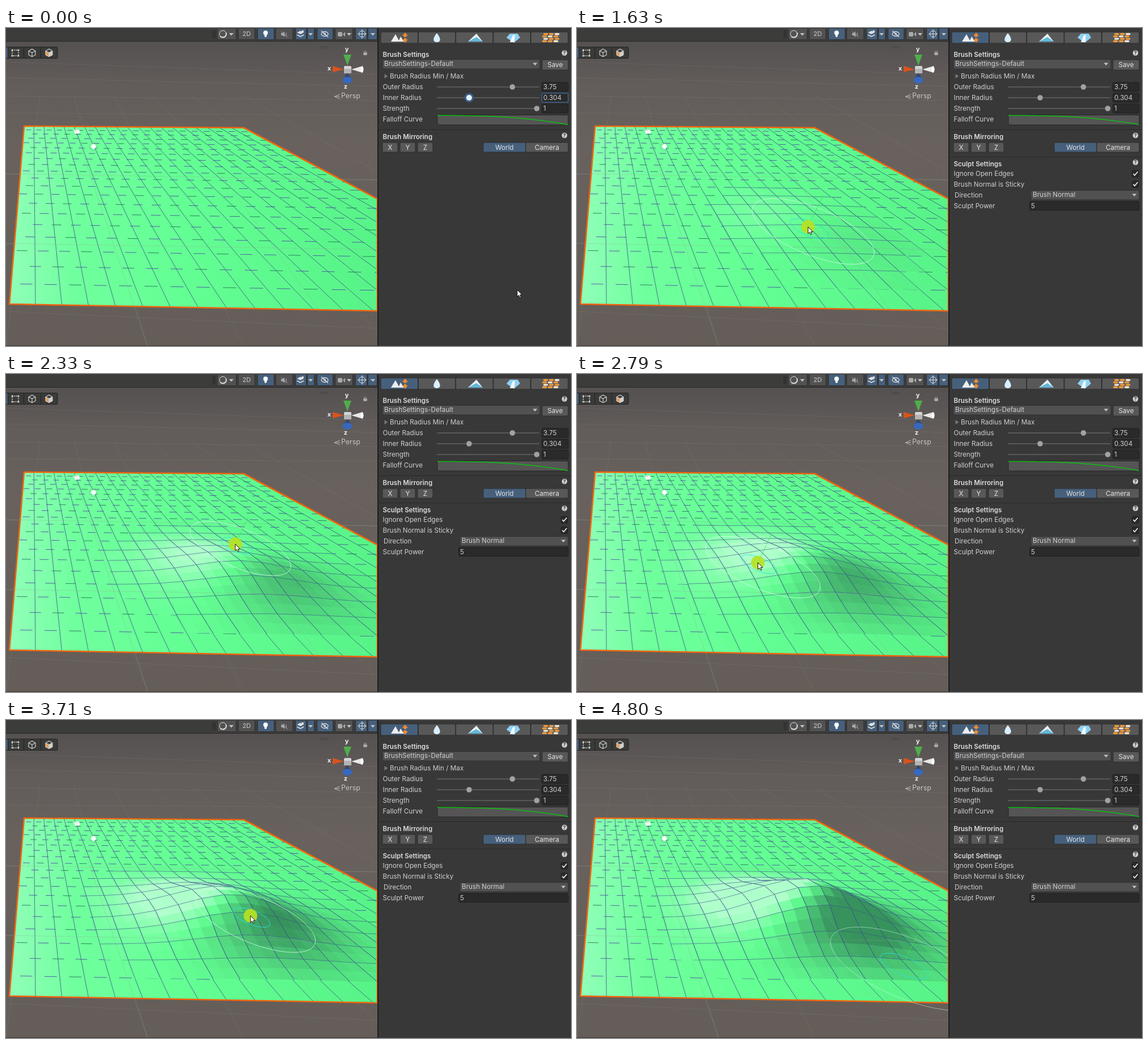
An HTML page with a canvas for the animation above (5420 ms loop, 998 by 561 pixels).

```html
<!DOCTYPE html>
<html lang="en">
<head>
<meta charset="utf-8">
<title>Mesh sculpting</title>
<style>
  html, body { margin: 0; width: 100%; height: 100%; overflow: hidden; background: #383838; }
  canvas { display: block; }
</style>
</head>
<body>
<canvas id="stage" width="998" height="561"></canvas>
<script>
const c = document.getElementById('stage').getContext('2d');
const LOOP = 5420, STEP = 77.7, SCULPT_AT = 760, SCENE_W = 656, N = 20;
const BLUE = '#46607c', GREY = '#585858', TEXT = '#d0d0d0';

// ---------- helpers ----------
const rgb = a => `rgb(${a.map(Math.round).join()})`;
const mix = (a, b, f) => a.map((v, i) => v + (b[i] - v) * f);
const ramp = (t, a, b) => Math.min(1, Math.max(0, (t - a) / (b - a)));

// Piecewise linear lookup in rows of [key, ...values].
function along(rows, at) {
  let n = rows.findIndex(r => r[0] > at);
  if (n < 0) return rows[rows.length - 1].slice(1);
  if (n === 0) return rows[0].slice(1);
  const a = rows[n - 1], b = rows[n];
  return mix(a, b, (at - a[0]) / (b[0] - a[0])).slice(1);
}
function rect(x, y, w, h, fill, border) {
  c.beginPath();
  c.roundRect(x, y, w, h, 2);
  c.fillStyle = fill;
  c.fill();
  if (border) { c.strokeStyle = border; c.lineWidth = 1; c.stroke(); }
}
function disc(x, y, r, fill) {
  c.beginPath();
  c.arc(x, y, r, 0, 7);
  c.fillStyle = fill;
  c.fill();
}
function path(points, closed) {
  c.beginPath();
  points.forEach(p => c.lineTo(p[0], p[1]));
  if (closed) c.closePath();
}
function poly(points, fill) { path(points, true); c.fillStyle = fill; c.fill(); }
function line(points, color, width = 1) {
  path(points);
  c.strokeStyle = color;
  c.lineWidth = width;
  c.stroke();
}
function text(s, x, y, { size = 11.7, weight = 400, color = TEXT, align = 'left' } = {}) {
  c.font = `${weight} ${size}px Inter, sans-serif`;
  c.fillStyle = color;
  c.textAlign = align;
  c.textBaseline = 'middle';
  c.fillText(s, x, y + 0.5);
}
const arrowDown = (x, y) => poly([[x - 4, y - 2], [x + 4, y - 2], [x, y + 2.5]], '#c4c4c4');

// ---------- mesh: column i from the left, row k from the front ----------
function vertex(i, k, lift = 0) {
  const u = i / N, v = 1 - k / N;
  const f = u * 0.885 / (1 - 0.115 * u), d = v * 0.41 / (1 - 0.59 * v);
  const left = [32 - 26 * d, 173 + 314 * d], right = [420 + 620 * d, 176 + 330 * d];
  const p = mix(left, right, f);
  return [p[0] + lift * 0.42, p[1] - lift];
}
// Sculpt strokes: column, row, height, start, end
const strokes = [
  [11, 5, 26, 1400, 2420],
  [9.5, 5.3, 20, 2420, 3500],
  [11.8, 5.1, 20, 3600, 4800]
];
function height(i, k, t) {
  let sum = 0;
  for (const [ci, ck, h, a, b] of strokes)
    sum += h * ramp(t, a, b) * Math.exp(-((i - ci) ** 2) / 8.8 - ((k - ck) ** 2) / 5.8);
  return sum < 0.4 ? 0 : sum;
}
const greens = [[0, 146, 255, 186], [120, 112, 255, 158], [300, 100, 255, 148], [656, 88, 243, 136]];

function shade(i, k, t, x) {
  const e = 0.5;
  const across = height(i + e, k, t) - height(i - e, k, t);
  const back = height(i, k + e, t) - height(i, k - e, t);
  const light = across * 1.2 - back * 0.9;
  const base = along(greens, x);
  return rgb(light > 0 ? mix(base, [200, 255, 222], Math.min(0.75, light / 13))
                       : mix(base, [48, 128, 84], Math.min(0.85, -light / 22)));
}
function hill(t) {
  const at = (i, k) => {
    const i0 = Math.floor(i), k0 = Math.floor(k), f = i - i0, g = k - k0;
    const h = (a, b) => height(a, b, t);
    const front = h(i0, k0) * (1 - f) + h(i0 + 1, k0) * f;
    const back = h(i0, k0 + 1) * (1 - f) + h(i0 + 1, k0 + 1) * f;
    return vertex(i, k, front * (1 - g) + back * g);
  };
  for (let k = 11; k >= 1; k--) {
    const raised = [];
    for (let i = 4; i < 18; i++)
      if (Math.max(height(i, k, t), height(i + 1, k, t), height(i, k + 1, t), height(i + 1, k + 1, t)) > 1)
        raised.push(i);
    for (const i of raised)
      for (const dk of [0.5, 0]) for (const di of [0, 0.5]) {
        const a = i + di, b = k + dk;
        const quad = [at(a, b), at(a + 0.5, b), at(a + 0.5, b + 0.5), at(a, b + 0.5)];
        const color = shade(a + 0.25, b + 0.25, t, quad[0][0]);
        poly(quad, color);
        c.strokeStyle = color;
        c.lineWidth = 0.7;
        c.stroke();
      }
    for (const i of raised) {
      line([at(i, k), at(i, k + 1), at(i + 1, k + 1), at(i + 1, k)], 'rgba(58,78,140,.75)', 0.8);
    }
  }
}
function mesh(t) {
  const outline = [vertex(0, 0), vertex(0, N), vertex(N, N), vertex(N, 0)];
  const fill = c.createLinearGradient(0, 0, SCENE_W, 0);
  for (const [x, ...color] of greens) fill.addColorStop(x / SCENE_W, rgb(color));
  poly(outline, fill);
  for (let i = 1; i < N; i++) line([vertex(i, 0), vertex(i, N)], 'rgba(48,68,130,.8)', 0.9);
  for (let k = 1; k < N; k++)
    for (let i = 0; i < N; i++) {
      const a = i + (k * 0.38) % 1, b = Math.min(N, a + 0.5);
      if (height(a, k, t) < 1)
        line([vertex(a, k), vertex(b, k)], (i + k) % 3 ? 'rgba(78,72,165,.85)' : 'rgba(35,110,85,.85)');
    }
  hill(t);
  const faint = 'rgba(150,160,150,.35)';
  line([[120, 174], [250, 561]], faint);
  line([[318, 174], [555, 500]], faint);
  line([[0, 257], [656, 268]], faint);
  line([[0, 380], [656, 391]], faint);
  path(outline, true);
  c.lineJoin = 'round';
  c.strokeStyle = '#f0640f';
  c.lineWidth = 2.6;
  c.stroke();
  line([vertex(N, N), [655.5, 301], [655.5, 500]], '#f0640f', 2);
}

// ---------- brush and pointer ----------
const approach = [[0, 903, 462], [70, 800, 260], [150, 697, 63], [300, 694, 44], [375, 687, 24]];
const sweep = [
  [760, 440, 330], [1090, 395, 375], [1320, 388, 402], [1480, 400, 376], [1630, 409, 348],
  [1870, 425, 292], [2100, 432, 286], [2330, 403, 301], [2640, 312, 322], [2940, 328, 345],
  [3250, 362, 355], [3520, 480, 350], [3720, 430, 345], [3920, 345, 350], [4170, 460, 347],
  [4400, 510, 385], [4710, 576, 431]
];
function ring(x, y, a, b, color) {
  c.beginPath();
  c.ellipse(x, y, a, b, 0.385, 0, 7);
  c.strokeStyle = color;
  c.lineWidth = 1;
  c.stroke();
}
function brush([x, y], pressed) {
  const s = 0.8 + Math.max(-20, y - 300) * 0.0033;
  line([[x, y], [x + 28 * s, y - 58 * s]], 'rgba(60,225,80,.75)');
  ring(x + 9, y + 8, 119 * s, 43 * s, `rgba(220,255,235,${pressed ? 0.75 : 0.5})`);
  ring(x + 2, y + 3, 37 * s, 13 * s, 'rgba(40,225,225,.85)');
}
function pointer(x, y) {
  path([[0, 0], [0, 12], [2.8, 9.5], [4.6, 13.6], [6.6, 12.7], [4.8, 8.8], [8.4, 8.6]].map(p => [x + p[0], y + p[1]]), true);
  c.fillStyle = '#fff';
  c.fill();
  c.strokeStyle = '#111';
  c.lineWidth = 1;
  c.stroke();
}
const press = (x, y) => disc(x, y, 12, 'rgba(182,226,36,.92)');

// ---------- scene view ----------
function background() {
  const g = c.createLinearGradient(0, 24, 0, 561);
  [[0, '#545150'], [0.14, '#625c5a'], [0.33, '#68615d'], [1, '#645d58']].forEach(s => g.addColorStop(...s));
  c.fillStyle = g;
  c.fillRect(0, 24, SCENE_W, 537);
  const faint = 'rgba(255,255,255,.06)';
  [[60, 82], [88, 103], [120, 128], [150, 154], [258, 268], [380, 391], [500, 530]].forEach(
    ([a, b]) => line([[0, a], [656, b]], faint));
  [[0, -300], [60, 0], [120, 250], [190, 420], [260, 680], [330, 900], [420, 1200]].forEach(
    ([a, b]) => line([[a, 120], [b, 561]], faint));
}
function sceneIcons() {
  poly([[120, 181], [129, 179], [131, 185], [122, 187]], '#f4f4f4');
  disc(124, 180, 2, '#ddd');
  c.setLineDash([1.5, 1.5]);
  ring(154.5, 209, 7, 7, '#8a8f88');
  c.setLineDash([]);
  disc(154.5, 209, 4.2, '#fff');
}
function gizmo() {
  line([[555, 32.5], [570, 32.5]], '#444');
  line([[555, 35], [570, 35]], '#444');
  const label = { size: 11, weight: 700, color: '#f0f0f0', align: 'center' };
  text('y', 602, 37, label);
  text('x', 571, 71, label);
  text('z', 600, 103, label);
  poly([[596, 47], [610, 47], [603, 66]], '#4fae4b');
  poly([[577, 67], [597, 73], [577, 78]], '#d9531c');
  poly([[630, 67], [610, 73], [630, 79]], '#e8e8e8');
  c.beginPath(); c.ellipse(629, 73, 2.5, 5.5, 0, 0, 7); c.fillStyle = '#fff'; c.fill();
  rect(597, 67, 13, 13, '#d4d4d4');
  c.fillStyle = '#b4b4b4'; c.fillRect(597, 72, 13, 8);
  poly([[603, 80], [595, 91], [611, 91]], '#27477f');
  c.beginPath(); c.ellipse(603, 92, 8.5, 6, 0, 0, 7); c.fillStyle = '#3768bd'; c.fill();
  rect(631, 43, 7, 5, '#aaa');
  c.beginPath(); c.arc(634.5, 43, 2.3, Math.PI, 0); c.strokeStyle = '#aaa'; c.stroke();
  for (const y of [117, 121, 125]) line([[590, y], [580, 121]], '#b8b8b8');
  text('Persp', 592, 120, { size: 12.4, color: '#c4c4c4' });
}
function cube(x, y, solid) {
  const p = [[x, y - 6.5], [x + 6, y - 3], [x + 6, y + 4], [x, y + 7], [x - 6, y + 4], [x - 6, y - 3]];
  if (solid) poly([[x, y], p[1], p[2], p[3]], '#d0d0d0');
  if (solid) poly([[x, y], p[3], p[4], p[5]], '#e89b4c');
  line([...p, p[0]], '#d0d0d0', 1.2);
  line([p[5], [x, y], p[1]], '#d0d0d0', 1.2);
  line([[x, y], p[3]], '#d0d0d0', 1.2);
}
function toolbars() {
  c.fillStyle = '#3c3c3b';
  c.fillRect(0, 0, SCENE_W, 23);
  line([[0, 23.5], [656, 23.5]], '#272727');
  line([[366, 4], [366, 18]], '#222');
  line([[369, 4], [369, 18]], '#222');
  [[373, 34], [410, 30], [444, 30, 1], [476, 31], [511, 20, 1], [532, 13, 1], [549, 29, 1], [581, 32], [617, 21, 1], [639, 17, 1]]
    .forEach(([x, w, on]) => rect(x + 0.5, 0.5, w - 1, 20, on ? BLUE : '#525252', '#303030'));
  const ink = '#e0e0e0';
  ring(383, 10.5, 6, 6, ink);
  c.beginPath(); c.arc(383, 10.5, 6, -0.4, 2.4); c.strokeStyle = ink; c.lineWidth = 2; c.stroke();
  [[398, 11], [538, 11], [606, 11], [648, 11]].forEach(p => arrowDown(...p));
  text('2D', 425, 10, { size: 11, align: 'center' });
  disc(458.5, 8.5, 4, '#fff');
  rect(456.5, 11, 4, 5, '#fff');
  poly([[486, 9], [489, 9], [492, 6], [492, 16], [489, 13], [486, 13]], '#aaa');
  line([[486, 6], [497, 16]], '#aaa');
  line([[495, 8], [495, 14]], '#aaa');
  poly([[514, 8], [520, 5], [526, 8], [520, 11]], ink);
  line([[514, 12], [520, 15], [526, 12]], ink, 1.8);
  disc(524, 6, 2, ink);
  c.beginPath(); c.ellipse(563, 10.5, 6, 4, 0, 0, 7); c.strokeStyle = ink; c.lineWidth = 1.3; c.stroke();
  disc(563, 10.5, 1.8, ink);
  line([[557, 5], [569, 16]], ink, 1.3);
  rect(586, 7, 8, 8, '#aaa');
  poly([[595, 11], [599, 7], [599, 15]], '#aaa');
  ring(629, 10.5, 5.5, 5.5, ink);
  line([[621, 10.5], [637, 10.5]], ink);
  line([[629, 2.5], [629, 18.5]], ink);

  rect(-5, 33.5, 96, 20, '#3a3a39', '#232323');
  c.fillStyle = BLUE; c.fillRect(0, 34, 3, 19);
  [3.5, 31.5, 61.5].forEach(x => line([[x, 34], [x, 53]], '#232323'));
  c.setLineDash([2, 1.5]);
  line([[11, 39], [22, 39], [22, 49], [11, 49], [11, 39]], '#ddd', 1.3);
  c.setLineDash([]);
  for (const x of [11, 22]) for (const y of [39, 49]) disc(x, y, 1.5, '#ddd');
  cube(46, 43.5);
  cube(76, 43.5, true);
}

// ---------- inspector ----------
function help(y) {
  disc(986.5, y, 4.8, '#d0d0d0');
  text('?', 986.5, y, { size: 8.5, weight: 700, color: '#333', align: 'center' });
}
function heading(s, y) {
  text(s, 665.5, y, { weight: 600, size: 11.6, color: '#dcdcdc' });
  help(y - 3);
}
function button(s, x, y, w, h, fill = GREY) {
  rect(x, y, w, h, fill, '#2c2c2c');
  text(s, x + w / 2, y + h / 2, { align: 'center', color: '#e4e4e4' });
}
function dropdown(s, x, y, w) {
  rect(x, y, w, 16.5, '#515151', '#303030');
  text(s, x + 3, y + 7.5);
  arrowDown(x + w - 8.5, y + 8);
}
function slider(s, y, knob, value, focused) {
  text(s, 665.5, y);
  line([[761, y], [942, y]], '#636363', 1.6);
  if (focused) {
    disc(knob, y, 8, '#3c628c');
    disc(knob, y, 5, '#e8f0f6');
  } else disc(knob, y, 4.8, '#a2a2a2');
  rect(946.5, y - 8, 46.5, 16, '#2a2a2a', focused ? '#3f7cbf' : '#1e1e1e');
  text(value, 949, y);
}
function tabIcons() {
  poly([[680, 24], [688, 11], [694, 22], [697, 15], [703, 24]], '#ededed');
  poly([[705, 8], [710, 14], [707, 14], [707, 16], [703, 16], [703, 14], [700, 14]], '#ef8a2c');
  poly([[705, 26], [710, 20], [707, 20], [707, 18], [703, 18], [703, 20], [700, 20]], '#ef8a2c');
  c.beginPath();
  c.moveTo(761, 9);
  c.bezierCurveTo(770, 20, 767, 25, 761, 25);
  c.bezierCurveTo(755, 25, 752, 20, 761, 9);
  c.fillStyle = '#d8efff'; c.fill();
  poly([[816, 24], [831, 10], [842, 24]], '#e8f2f4');
  poly([[816, 24], [831, 16], [842, 24]], '#62b7d8');
  poly([[884, 17], [890, 10], [904, 10], [908, 17], [897, 26]], '#8ed0f2');
  poly([[890, 25], [895, 13], [899, 12], [898, 25]], '#eefaff');
  for (let r = 0; r < 4; r++)
    for (let n = 0; n < 3; n++)
      rect(949 + n * 10 - (r % 2) * 2, 9 + r * 4.2, 8.5, 3.4, (n + r) % 3 < 2 ? '#f09a3c' : '#f3e6d4');
}
function inspector(t) {
  const sculpting = t >= SCULPT_AT, focused = t < 1475;
  c.fillStyle = '#383838';
  c.fillRect(SCENE_W, 0, 342, 561);
  c.fillStyle = '#1f1f1f';
  c.fillRect(656, 0, 2, 561);
  for (let n = 0; n < 5; n++)
    rect(662 + n * 66.3, 7, 65.6, 20, n === 0 && sculpting ? BLUE : GREY, '#2c2c2c');
  tabIcons();

  heading('Brush Settings', 47);
  dropdown('BrushSettings-Default', 665, 55.5, 278);
  button('Save', 947, 56, 46, 18);
  poly([[668.5, 81], [674.5, 85], [668.5, 89]], '#777');
  text('Brush Radius Min / Max', 678, 85);
  slider('Outer Radius', 104, 894.5, '3.75');
  slider('Inner Radius', 123, 818, '0.304', focused);
  slider('Strength', 142, 937.5, '1');
  text('Falloff Curve', 665.5, 161);
  rect(762, 153.5, 231, 17.5, '#555', '#252525');
  line(Array.from({ length: 41 }, (_, n) => [762 + n * 5.77, 154.3 + 16.2 * (n / 40) ** 2.6]), '#0cc010', 1.5);
  line([[658, 179.5], [998, 179.5]], '#282828');

  heading('Brush Mirroring', 192.5);
  ['X', 'Y', 'Z'].forEach((s, n) => button(s, 665 + n * 31, 202, 27, 17));
  button('World', 843, 202, 75, 17, BLUE);
  button('Camera', 918, 202, 75, 17);
  if (!sculpting) return;

  line([[658, 227.5], [998, 227.5]], '#2c2c2c');
  heading('Sculpt Settings', 240);
  [['Ignore Open Edges', 257], ['Brush Normal is Sticky', 275.5]].forEach(([s, y]) => {
    text(s, 665.5, y);
    rect(980.5, y - 5.5, 11.5, 11.5, '#2a2a2a', '#1c1c1c');
    line([[982.5, y], [985, y + 3], [990.5, y - 3.5]], '#f0f0f0', 1.7);
  });
  text('Direction', 667, 294.5);
  dropdown('Brush Normal', 802, 286.5, 191);
  text('Sculpt Power', 665.5, 313.5);
  rect(799.5, 306, 193.5, 15.5, '#2a2a2a', '#1f1f1f');
  text('5', 802, 313.5);
}

// ---------- frame ----------
function draw(now) {
  const time = now % LOOP;
  const t = time < SCULPT_AT ? time
    : Math.min(4800, SCULPT_AT + Math.floor((time - SCULPT_AT + 4) / STEP) * STEP);
  const spot = along(sweep, t);
  const pressed = t > 1470 && t < 4400;

  c.save();
  c.beginPath();
  c.rect(0, 0, SCENE_W, 561);
  c.clip();
  background();
  mesh(t);
  sceneIcons();
  gizmo();
  if (t >= SCULPT_AT) brush(spot, pressed);
  toolbars();
  line([[0, 560.5], [656, 560.5]], '#3a3735');
  c.restore();
  inspector(t);

  if (t < 610) {
    if (t >= 375 && t < 450) press(691, 20);
    pointer(...approach.filter(a => a[0] <= t).pop().slice(1));
  } else if (t >= SCULPT_AT && t < 4780) {
    const lead = ramp(t, 4250, 4710);
    const x = spot[0] + 87 * lead, y = spot[1] + 38 * lead;
    if (pressed) press(x, y);
    pointer(x, y);
  }
}
function tick() {
  draw(performance.now());
  requestAnimationFrame(tick);
}
tick();
</script>
</body>
</html>
```
